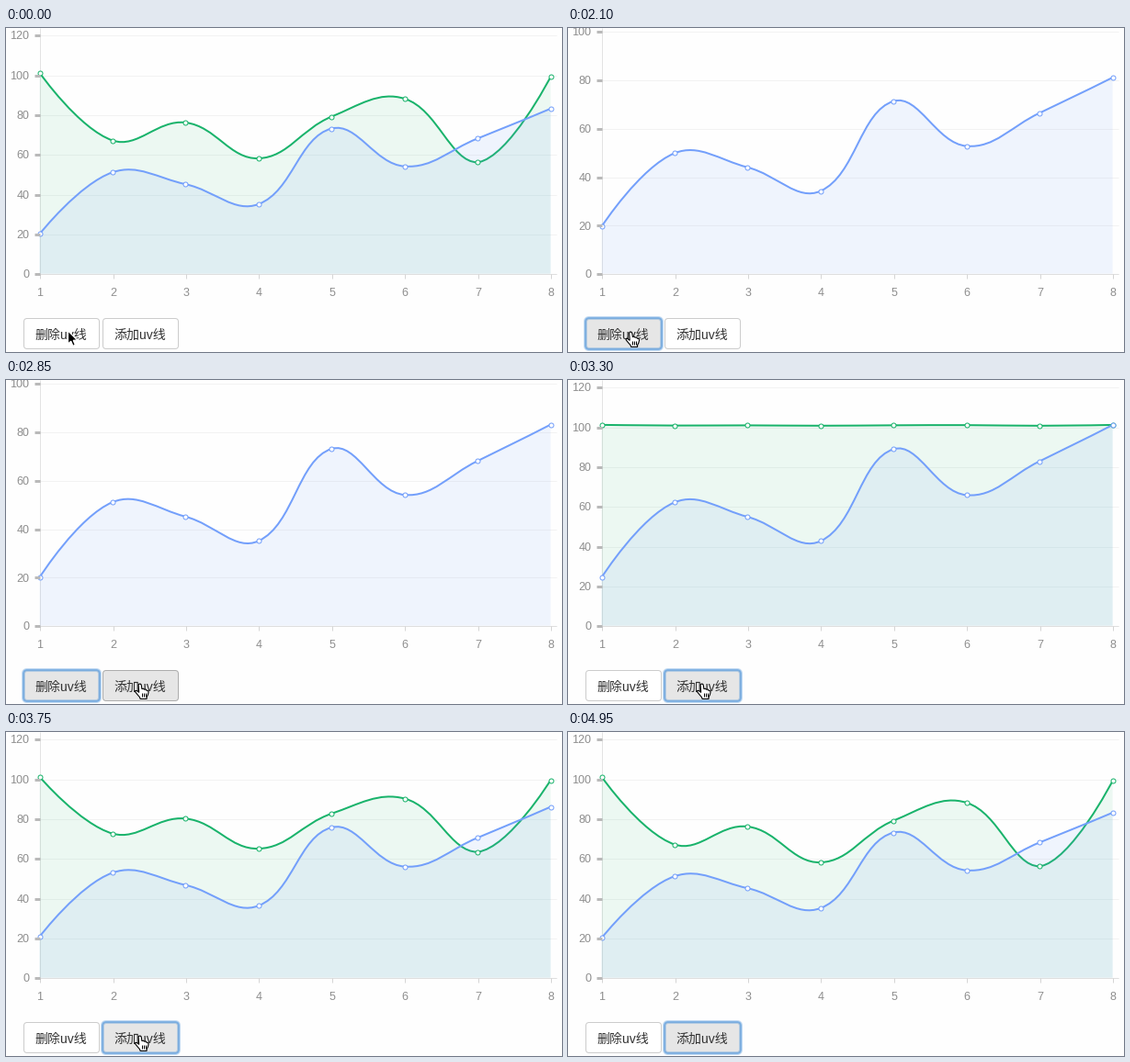
Recreate the animation shown at these times as a matplotlib script. Size 605 by 353 pixels, loop 5670 ms.

```python
import numpy as np
import matplotlib.pyplot as plt
from matplotlib.animation import FuncAnimation
from matplotlib.patches import FancyBboxPatch, PathPatch, Polygon
from matplotlib.path import Path

W, H, DPI = 605, 353, 100
LOOP, TICK, HOLD = 5670, 30, 150
LEFT, RIGHT, BASE = 36.6, 592.6, 267.7
REMOVE_AT, HOVER_AT, ADD_AT = 1650, 2850, 3300
PX = 72 / DPI

GREEN, BLUE = "#19b36b", "#739ffb"
PV = np.array([101, 67, 76, 58, 79, 88, 56, 99])
UV = np.array([20, 51, 45, 35, 73, 54, 68, 83])
XS = np.linspace(LEFT, RIGHT, len(UV))
WIDE, TIGHT = 260 / 120, 264 / 100  # pixels per unit on the two scales

# start time, kind, left, top
CURSOR = [
    (0, "arrow", 67.5, 330), (REMOVE_AT, "hand", 62, 330),
    (2700, "arrow", 112, 331), (HOVER_AT, "hand", 139.5, 330),
    (4350, "arrow", 270, 330), (4500, "arrow", 449, 328.5),
    (4650, "arrow", 556, 340), (4800, "arrow", 561, 351),
    (4950, None, 0, 0),
]
ARROW = np.array([(0, 0), (0, 14), (3.2, 11.2), (5.4, 16.3), (7.8, 15.3),
                  (5.7, 10.3), (10, 10)])
HAND = np.array([(4.6, 2.2), (5.6, 1), (7.2, 1.3), (7.9, 3), (8.4, 6.6),
                 (10, 6.2), (11, 7.2), (12.6, 7), (13.4, 8.2), (15, 8.4),
                 (15.6, 10), (14.8, 13.2), (13.6, 15.4), (13.6, 17.4),
                 (6.6, 17.4), (6, 15.6), (3.4, 12.6), (1, 9.6), (1.4, 8.4),
                 (3, 8.6), (5.2, 10.4)])
HAND_FOLDS = np.array([(8, 11), (8, 14.6), (np.nan, np.nan), (10, 11),
                       (10, 14.6), (np.nan, np.nan), (12, 11), (12, 14.6)])


def ease(x):
    """CSS 'ease' curve."""
    s = np.linspace(0, 1, 400)
    px = .75 * (1 - s) ** 2 * s + .75 * (1 - s) * s ** 2 + s ** 3
    py = .3 * (1 - s) ** 2 * s + 3 * (1 - s) * s ** 2 + s ** 3
    return np.interp(x, px, py)


def points(values, scale):
    return np.column_stack([XS, BASE - values * scale])


def spline(pts, tension=.4):
    """Cubic Bezier vertices through pts, kept inside their lower bound."""
    verts = [pts[0], pts[0]]
    for before, here, after in zip(pts, pts[1:], pts[2:]):
        d0 = np.hypot(*(here - before))
        d1 = np.hypot(*(after - here))
        v = tension * (after - before) / (d0 + d1)
        for ctrl in (here - v * d0, here, here + v * d1):
            verts.append(np.minimum(ctrl, pts.max(axis=0)))
    return np.array(verts + [pts[-1], pts[-1]])


fig = plt.figure(figsize=(W / DPI, H / DPI), dpi=DPI, facecolor="#fefefe")
ax = fig.add_axes([0, 0, 1, 1])
ax.set(xlim=(0, W), ylim=(H, 0))
ax.axis("off")


def rule(x, y, color, width, z):
    return ax.plot(x, y, color=color, lw=width * PX, zorder=z,
                   solid_capstyle="butt")[0]


def label(x, y, text, **kw):
    style = dict(color="#8e8e8e", fontsize=12.5 * PX, va="center_baseline",
                 family=["Liberation Sans", "Noto Sans CJK JP"], zorder=8)
    return ax.text(x, y, text, **{**style, **kw})


class Scale:
    """Grid lines, ticks and labels of one vertical scale."""

    def __init__(self, top, unit):
        self.parts = []
        for value in range(0, top + 1, 20):
            y = BASE - value * unit
            row = np.floor(y) + .5
            self.parts += [
                rule([37, 599], [row, row], "#f2f2f2", 1, 1),
                rule([31, 37], [row, row], "#b9b9b9", 3, 6),
                label(25.5, y + .3, str(value), ha="right"),
            ]

    def show(self, on):
        for part in self.parts:
            part.set_visible(on)


class Series:
    """Smooth line with a tinted area and round markers."""

    def __init__(self, color, tint, z):
        self.area = PathPatch(Path([(0, 0)]), fc=color, ec="none", alpha=tint,
                              zorder=z)
        self.line = PathPatch(Path([(0, 0)]), fc="none", ec=color,
                              lw=2 * PX, zorder=z + .1)
        ax.add_patch(self.area)
        ax.add_patch(self.line)
        self.dots, = ax.plot([], [], "o", ms=5 * PX, mfc="white", mec=color,
                             mew=1 * PX, zorder=z + 2, snap=False)

    def show(self, on):
        for part in (self.area, self.line, self.dots):
            part.set_visible(on)

    def morph(self, start, end, amount):
        verts = (1 - amount) * spline(start) + amount * spline(end)
        codes = [Path.MOVETO] + [Path.CURVE4] * (len(verts) - 1)
        self.line.set_path(Path(verts, codes))
        foot = [(RIGHT, BASE), (LEFT, BASE)]
        self.area.set_path(Path(np.vstack([verts, foot]),
                                codes + [Path.LINETO] * 2))
        self.dots.set_data(*verts[::3].T)


class Button:
    def __init__(self, x, text):
        def box(grow, **kw):
            patch = FancyBboxPatch(
                (x + .5 - grow, 316.5 - grow), 82 + 2 * grow, 33 + 2 * grow,
                boxstyle=f"round,pad=0,rounding_size={3.5 + grow}", **kw)
            return ax.add_patch(patch)

        self.face = box(0, lw=PX, zorder=7)
        self.ring = [
            box(.5, fc="none", ec="#6aa5e0", alpha=.4, lw=4 * PX, zorder=7.1),
            box(.5, fc="none", ec="#7aaee2", lw=1.7 * PX, zorder=7.2),
        ]
        label(x + 40.8, 333.2, text, ha="center", color="#333333",
              fontsize=14 * PX)

    def style(self, hover, focus):
        lit = hover or focus
        self.face.set(facecolor="#e6e6e6" if lit else "#ffffff",
                      edgecolor="#adadad" if lit else "#cccccc")
        for ring in self.ring:
            ring.set_visible(focus)


wide_scale, tight_scale = Scale(120, WIDE), Scale(100, TIGHT)
rule([36.5, 36.5], [0, 267], "#e3e3e3", 1, 2)
rule([36, 599], [267.5, 267.5], "#dedede", 1, 5)
for i, x in enumerate(XS, 1):
    col = np.floor(x) + .5
    rule([col, col], [268, 273], "#d5d5d5", 1, 5)
    label(x + .3, 287.3, str(i), ha="center")

pv_series, uv_series = Series(GREEN, .08, 3), Series(BLUE, .1, 3.5)
remove_button = Button(19, "删除uv线")
add_button = Button(105, "添加uv线")

arrow = ax.add_patch(Polygon(ARROW, fc="black", ec="white", lw=1.2 * PX,
                             zorder=10))
hand = ax.add_patch(Polygon(HAND, fc="white", ec="black", lw=1.1 * PX,
                            zorder=10))
folds = rule([], [], "black", 1, 11)


def move_cursor(t):
    _, kind, x, y = [key for key in CURSOR if key[0] <= t][-1]
    arrow.set_visible(kind == "arrow")
    hand.set_visible(kind == "hand")
    folds.set_visible(kind == "hand")
    arrow.set_xy(ARROW + (x, y))
    hand.set_xy(HAND + (x, y))
    folds.set_data(*(HAND_FOLDS + (x, y)).T)


def update(n):
    t = n * TICK // HOLD * HOLD
    removed = REMOVE_AT <= t < ADD_AT
    wide_scale.show(not removed)
    tight_scale.show(removed)
    pv_series.show(not removed)

    wide_uv, tight_uv = points(UV, WIDE), points(UV, TIGHT)
    pv = points(PV, WIDE)
    if removed:
        amount = ease((t - REMOVE_AT) / 1000 + .12)
        uv_series.morph(wide_uv, tight_uv, amount)
    else:
        since = t - ADD_AT
        lag = .09 if since else .02
        amount = ease(since / 1000 + lag) if since >= 0 else 1
        uv_series.morph(tight_uv, wide_uv, amount)
        flat = np.column_stack([XS, np.full(len(XS), pv[0, 1])])
        pv_series.morph(flat, pv, amount)

    remove_button.style(False, removed)
    add_button.style(HOVER_AT <= t < ADD_AT, t >= ADD_AT)
    move_cursor(t)
    return []


anim = FuncAnimation(fig, update, frames=LOOP // TICK, interval=TICK,
                     repeat=True, repeat_delay=0, blit=False)
plt.show()
```
